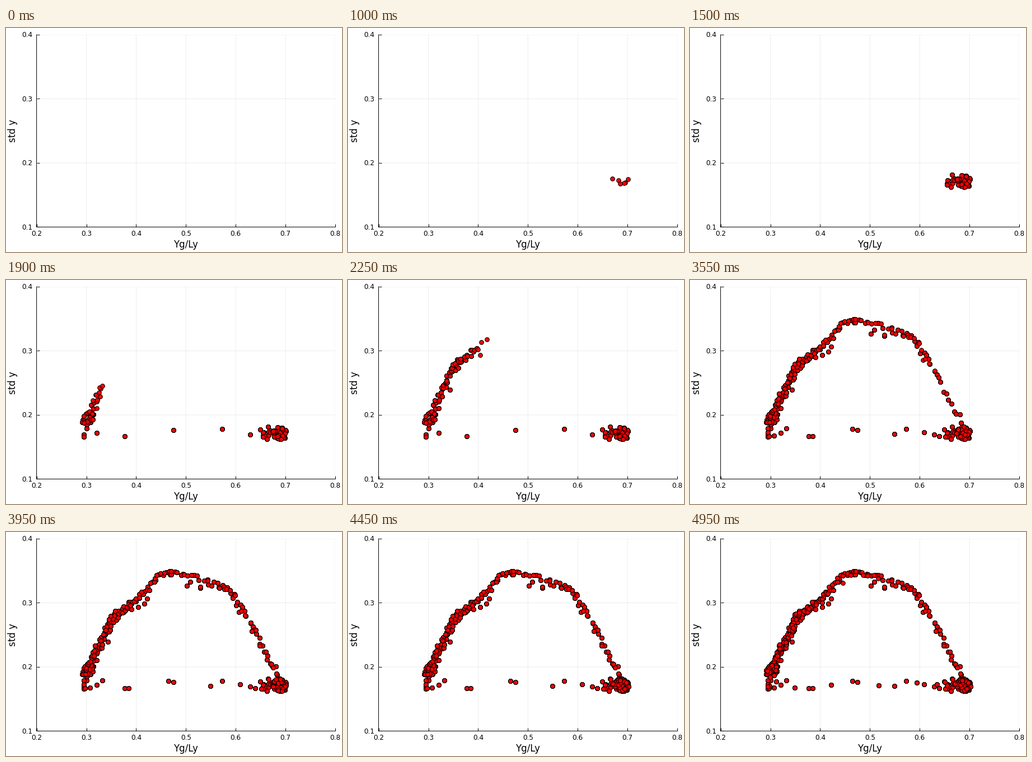
Write a matplotlib script that moves like this. It is 600x400 px and loops after 5000 ms.

```python
import numpy as np
import matplotlib.pyplot as plt
from matplotlib.animation import FuncAnimation

W, H, DPI = 600, 400, 100
FRAMES, STEP = 100, 50
PASSES = 6  # earlier points are stamped again, which hardens their rims
PX = 72 / DPI

plt.rcParams["font.family"] = "DejaVu Sans"
rng = np.random.default_rng(12)

# Key points of the orbit, in thousandths of the axis units
RISE = [(308, 205), (316, 222), (326, 238), (337, 250), (346, 266), (356, 282), (367, 288)]
ARCH = [(372, 288), (382, 296), (394, 300), (408, 309), (424, 325), (446, 341),
        (472, 346), (502, 343), (540, 335), (576, 325), (600, 311)]
FALL = [(602, 303), (617, 284), (636, 263), (650, 234), (667, 210), (685, 191)]


def cloud(n, cx, cy, rx, ry, tilt):
    r, a = np.sqrt(rng.random(n)), rng.random(n) * 2 * np.pi
    dx = rx * r * np.cos(a)
    return np.column_stack([cx + dx, cy + ry * r * np.sin(a) + tilt * dx])


def right(n):
    """Resting cloud with a few stragglers on its left."""
    p = cloud(n, 688, 172, 15, 10, -0.15)
    p[:, 0] -= (rng.random(n) < 0.12) * rng.uniform(0, 40, n)
    return p


def cross(n):
    """Quick crossing along the bottom, slow at both ends."""
    u = np.linspace(0.1, 1, n)
    s = u**3 / (u**3 + (1 - u)**3)
    return np.column_stack([655 - 360 * s, 173 + rng.uniform(-7, 7, n)])


def left(n):
    return cloud(n, 303, 195, 12, 10, 0.3)


def trail(knots, jx, jy):
    """Noisy walk along the knots; now and then a point drops below."""
    def walk(n):
        u, i = np.linspace(0, len(knots) - 1, n), np.arange(len(knots))
        x, y = (np.interp(u, i, k) for k in zip(*knots))
        dip = (rng.random(n) < 0.12) * rng.uniform(5, 15, n)
        return np.column_stack([x + rng.uniform(-jx, jx, n),
                                y + rng.uniform(-jy, jy, n) - dip])
    return walk


STAGES = [right, cross, left, trail(RISE, 5, 4), trail(ARCH, 4, 5), trail(FALL, 3, 4)]
# For each lap: first frame of every stage and the end, then points per stage
LAPS = [
    ((20, 31, 33, 37, 42, 54, 57), (58, 10, 26, 50, 46, 17)),
    ((57, 60, 62, 65, 68, 71, 74), (24, 12, 20, 38, 44, 14)),
    ((74, 90, 93, 95, 97, 101, 101), (58, 11, 18, 30, 36, 0)),
]

parts, births = [], []
for starts, counts in LAPS:
    for stage, n, a, b in zip(STAGES, counts, starts, starts[1:]):
        parts.append(stage(n) / 1000)
        births.append(np.floor(np.linspace(a, b, n, endpoint=False)))
points, born = np.vstack(parts), np.concatenate(births)

fig = plt.figure(figsize=(W / DPI, H / DPI), dpi=DPI, facecolor="white")
L, R, T, B = 54.6, 588, 12, 355.4
ax = fig.add_axes([L / W, 1 - B / H, (R - L) / W, (B - T) / H])
ax.set(xlim=(0.2, 0.8), ylim=(0.1, 0.4))
xticks, yticks = np.linspace(0.2, 0.8, 7), np.linspace(0.1, 0.4, 4)
ax.set_xticks(xticks)
ax.set_yticks(yticks)
ax.tick_params(direction="in", length=5 * PX, width=PX,
               labelbottom=False, labelleft=False)
ax.grid(color="black", alpha=0.07, linewidth=PX, snap=False)
ax.set_axisbelow(True)
ax.spines[["top", "right"]].set_visible(False)
for side in ("left", "bottom"):
    ax.spines[side].set(linewidth=PX, snap=False)


def label(x, y, s, size, ha="center", rotation=0):
    fig.text(x / W, 1 - y / H, s, size=size, ha=ha, va="baseline",
             rotation=rotation, rotation_mode="anchor")


TICK, GUIDE = 8.73, 12
for v in xticks:
    label(L + (v - 0.2) / 0.6 * (R - L), 371.4, f"{v:.1f}", TICK)
for v in yticks:
    label(47.6, B - (v - 0.1) / 0.3 * (B - T) + 4.2, f"{v:.1f}", TICK, "right")
label((L + R) / 2, 392.2, "Yg/Ly", GUIDE)
label(16.8, (T + B) / 2, "std y", GUIDE, rotation=90)

dots = ax.scatter([], [], s=(7.6 * PX) ** 2, facecolor="red", edgecolor="black",
                  linewidth=1.05 * PX, zorder=5, clip_on=False)


def draw(frame):
    dots.set_offsets(np.vstack([points[born <= frame - k]
                                for k in reversed(range(PASSES))]))
    return (dots,)


anim = FuncAnimation(fig, draw, frames=FRAMES, interval=STEP,
                     repeat=True, repeat_delay=0, blit=False)
plt.show()
```
